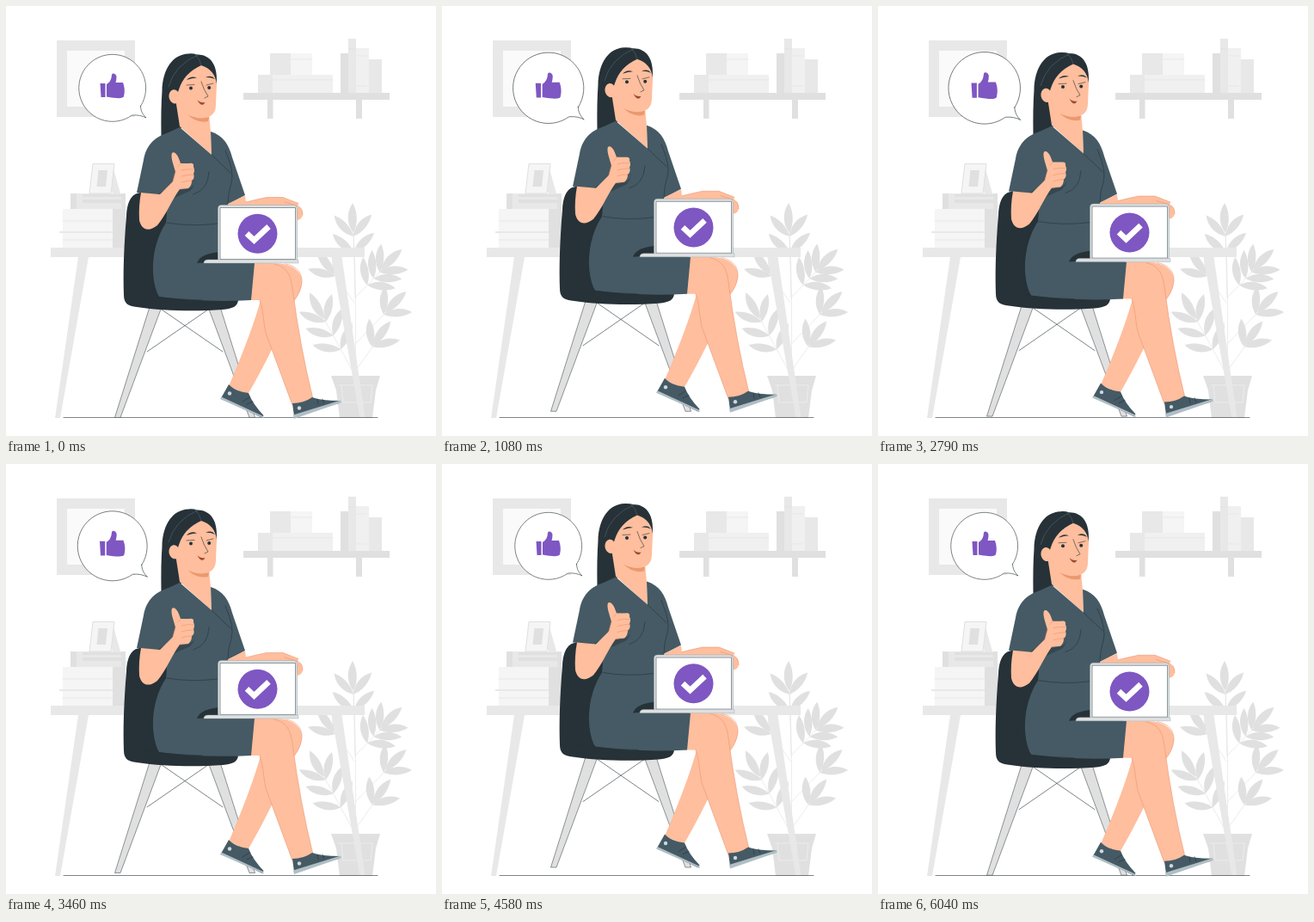
These frames come from a looping animation (500 px wide and 500 px high, 6080 ms). An HTML page:

```html
<!DOCTYPE html>
<html lang="en">
<head>
<meta charset="utf-8">
<title>Thumbs up</title>
<style>
html, body { margin: 0; width: 100%; height: 100%; overflow: hidden; background: #fff; }
svg { display: block; width: 100%; height: 100%; }
.a { fill: #e0e0e0; }
.b { fill: #e8e8e8; }
.c { fill: #f0f0f0; }
.d { fill: #f5f5f5; }
.skin { fill: #ffbe9d; }
.dress { fill: #455a64; }
.dark { fill: #263238; }
.purple { fill: #7e57c2; }
.sole { fill: #b0bec5; }
.ink, .crease, .grey { fill: none; stroke: #263238; stroke-width: .6; stroke-linecap: round; stroke-linejoin: round; }
.crease { stroke: #eb9470; }
.grey { stroke: #e0e0e0; }
.hair { stroke: #56666e; }
</style>
</head>
<body>
<svg viewBox="0 0 500 500">
  <!-- wall -->
  <path class="b" d="M59 40H150V129H59Z"/>
  <path fill="#fafafa" d="M71 52H138V117H71Z"/>
  <path class="a" d="M276 101H446V109H276ZM304 109H310.500V131H304ZM407 109H414V131H407ZM389 55H398V101H389Z"/>
  <path class="c" d="M293 80H380V101H293ZM405 49H422V101H405Z"/>
  <path class="b" d="M293 80H310V101H293ZM307 55H331V80H307ZM398 38H407V101H398ZM422 62H437V101H422Z"/>
  <path class="d" d="M331 55H356V80H331Z"/>
  <path class="grey" d="M331 62H356M310 86H380M398 50H407M408 58H419M408 93H419"/>

  <!-- plant and desk -->
  <path class="grey" d="M406 432Q408 340 404 262"/>
  <g id="plant" class="a"></g>
  <path class="a" d="M378 430H435L430 447L426 479H388L384 447Z"/>
  <path fill="none" stroke="#ececec" d="M387 441H426L424 461H392L390 441"/>
  <path id="deskLeg" class="b" d="M84 292H96L63 479H57Z"/>
  <use href="#deskLeg" transform="translate(474.500) scale(-1 1)"/>
  <path class="b" d="M52 281H417V292H52Z"/>
  <path class="a" d="M124 236H139V281H124ZM75 218H139V236H75Z"/>
  <path class="d" d="M66 236H124V262H66ZM66 264H124V281H66Z"/>
  <path class="b" d="M62 262H124V264H62ZM82 218H134V236H82Z"/>
  <path class="a" d="M89 219H134V222H89ZM89 225H134V229H89Z"/>
  <path class="grey" d="M66 250H124M66 272H124"/>
  <path class="b" d="M125 189L133 218H124L121 210Z"/>
  <path class="d" stroke="#e0e0e0" d="M101 183.500H126L122 218H97Z"/>
  <path class="a" d="M107.500 191H118L116 210H105.500Z"/>
  <path class="ink" d="M67 478.500H432"/>

  <g id="bubble">
    <path fill="#fff" class="ink" style="fill:#fff" d="M156.500 116.500A39 39 0 1 0 146.500 127C153 126.500 158 127.500 163 130C159 126.500 156.500 121.500 156.500 116.500Z"/>
    <path class="purple" d="M109.500 90H115.500V106H110.500ZM117 91Q122.500 88 123 80C124 77 128 79 128.500 82Q128.500 86 127.500 89H136Q139 97 137 105Q136 109 117 105.500Z"/>
  </g>

  <g id="woman">
    <!-- chair -->
    <g id="chairSide">
      <path class="ink" d="M181 353L252 402"/>
      <path class="a" stroke="#263238" stroke-width=".5" d="M167 350H181L133 478.500H126.500Z"/>
    </g>
    <use href="#chairSide" transform="translate(416) scale(-1 1)"/>
    <path class="dark" d="M160 217C148 216 141 224 140 244C137 280 136 312 137 336C137 346 142 349 152 350C184 355 224 355 252 353C264 352 270 349 270 341L190 325V217Z"/>

    <!-- legs -->
    <path class="skin" d="M305 299.500C333 297 345 309 344 322C343 336 334 341 328 356Q311 400 281 452L259 442Q286 379 296 342Z"/>
    <path class="crease" d="M325 300C339 302 345 312 344 322C342 335 336 341 333 345"/>
    <path class="skin" d="M284 299H302C322 299 330 307 333 328Q342 397 357 457L333 464L302 380C299 365 299 352 295 342H282Z"/>
    <path class="crease" d="M312 300C326 303 331 312 333 328Q342 397 357 457M295 342C299 352 299 365 302 380L333 464"/>
    <path class="dress" d="M259 440C266 447 274 449 282 450Q287 463 299.500 476L298 479L250 456Z"/>
    <path class="sole" d="M250.500 454.500L299 477L300 479.500L249 457Z"/>
    <path class="dress" d="M333 462Q346 462 356 455Q366 459 389 459L387 462L335 477Z"/>
    <path class="sole" d="M334 475.500L389 458.500L390 461L335 480Z"/>
    <g fill="#cfd8dc"><circle cx="260" cy="450.500" r="2.200"/><circle cx="341" cy="467.500" r="2.200"/></g>
    <path class="ink" d="M275 460L283 455M280 463L287 460M362 457L363 463M368 457L370 462"/>

    <!-- hair and head -->
    <path class="dark" d="M180.500 152Q180 119 181.500 99C182 72 195 56 212 55.500Q218 55 222 56.500C239 56.500 246 70 245 89L240 120L202 143Z"/>
    <path class="skin" d="M197 108L202 140L239 173L238 147L236 125Z"/>
    <path fill="#eb996e" d="M211 126Q224 133 236 129L235 134Q222 137 211 126Z"/>
    <path class="skin" d="M201 97Q207 78 227 69Q243 74 245 91L244 115C244 126 237 130 228 130C214 130 203 123 199 113C193 115 189 109 189.500 104C190 97 197 95 200 100Z"/>
    <path class="ink hair" d="M224 56.500Q196 68 189 94M220 56.500Q226 62 227 69"/>
    <path class="dark" d="M210 86Q215 80.500 222 83.500Q216 83.500 210 86ZM232 83Q239 79.500 243 85Q238 82.500 232 83Z"/>
    <circle class="dark" cx="215" cy="95.500" r="2"/><circle class="dark" cx="236.200" cy="95" r="2"/>
    <path class="ink" d="M210 92L219 91.500M233 92L241 90M227 88Q230 98 235 105L231 107"/>
    <path fill="#9c4a35" d="M222.500 109Q226 113 231.500 112C229 117 225 115 222.500 109Z"/>

    <!-- dress -->
    <path class="dress" d="M202 141L239 173L238 146C253 151 259 161 263 176L278 220L259 230L256 294L289 299L285 342Q230 345 178 338C168 320 167 281 186 252L187 235L178 219L152 217L160 179C163 163 171 153 189 147Z"/>
    <path fill="#37474f" d="M176 219L194 208L187 227ZM199 214L210 213Q217 212 220 204L219 196Q222 207 214 215L194 224Z"/>
    <path class="dark" d="M186 251C171 266 168 290 171 315Q172 331 178 338L162 336C160 302 160 259 187 236Z"/>
    <path class="ink" d="M239 173L261 194M255 168Q266 193 262 206Q258 218 258 230M236 193Q235 214 218 219M187 252Q216 257 246 253M150 334Q180 341 228 342"/>

    <!-- raised arm -->
    <path class="skin" d="M157 217L179 219L194 204L197 193C195 185 191 176 193 171C197 168 201 176 203 183H213Q219 182 218 187Q220 191 218 195Q220 200 216 203Q216 209 212 212L202 213C192 227 186 243 176 255C165 264 157 259 155 249Q154 233 157 217Z"/>
    <path class="crease" d="M203 183L200 187M204 191Q211 189 218 190M204 198Q211 196 218 196M204 205Q210 203 216 203M197 193Q195 200 194 204M202 213L207 212"/>

    <!-- laptop -->
    <path class="dark" d="M222 299C225 290 237 287 249 286V297Z"/>
    <path class="skin" d="M258 230L278 220.500L279 228Q291 225 303 222.500H322L340 229.500L339 233Q345 234 345 243Q344 248 339 249L335 235L258 236Z"/>
    <path class="crease" d="M279 228Q291 225 303 222.500H322L340 229.500M324 228L338 232Q345 234 345 243"/>
    <rect class="a" x="246.500" y="231.500" width="92" height="66" rx="4" stroke="#90a4ae" stroke-width=".5"/>
    <path fill="#fff" stroke="#455a64" stroke-width=".6" d="M249 234.500H336.500V294.500H249Z"/>
    <path class="a" stroke="#90a4ae" stroke-width=".4" d="M230 299Q230 295 235 295H340V299Z"/>
    <circle class="purple" cx="292.500" cy="264.800" r="23"/>
    <path fill="none" stroke="#fff" stroke-width="6.600" d="M280 264.500L288.500 272.500L305.500 256.500"/>
  </g>
</svg>
<script>
const LOOP = 6080, FLOAT = 3000, PULSE = 1500;
const byId = id => document.getElementById(id);

function leaf(x, y, angle, size) {
  const turn = angle * 180 / Math.PI;
  return `<path transform="translate(${x} ${y}) rotate(${turn}) scale(${size})"
    d="M0 0C.3 -.22 .7 -.22 1 0C.7 .16 .3 .16 0 0"/>`;
}

// A twig from (x, y) to (u, v): pairs of leaves around a leaf at its tip
function twig(x, y, u, v, pairs) {
  const angle = Math.atan2(v - y, u - x);
  let out = `<path class="grey" d="M${x} ${y}L${u} ${v}"/>` + leaf(u, v, angle, 35);
  for (let i = 0; i < pairs; i++) {
    const f = .95 - .25 * i;
    for (const side of [-1, 1])
      out += leaf(x + (u - x) * f, y + (v - y) * f, angle + side * (.72 + .1 * i), 33);
  }
  return out;
}

byId('plant').innerHTML =
  twig(406, 340, 404, 264, 2) + twig(407, 338, 436, 308, 3) +
  twig(407, 392, 441, 357, 1) + twig(408, 422, 427, 395, 1) +
  twig(405, 345, 382, 312, 1) + twig(405, 428, 370, 364, 3);

// Linear rise and fall over one period
const triangle = p => p < 0 || p > 1 ? 0 : 1 - Math.abs(2 * p - 1);

function draw() {
  const t = performance.now() % LOOP;
  const lift = 10 * triangle(t % FLOAT / FLOAT);
  const pulse = triangle(t / PULSE) + triangle((t - 1.5 * PULSE) / PULSE);
  byId('woman').setAttribute('transform', `translate(0 ${-lift})`);
  byId('bubble').setAttribute('transform',
    `translate(123.500 95.500) scale(${1 + .1 * pulse}) translate(-123.500 -95.500)`);
  requestAnimationFrame(draw);
}
draw();
</script>
</body>
</html>
```
